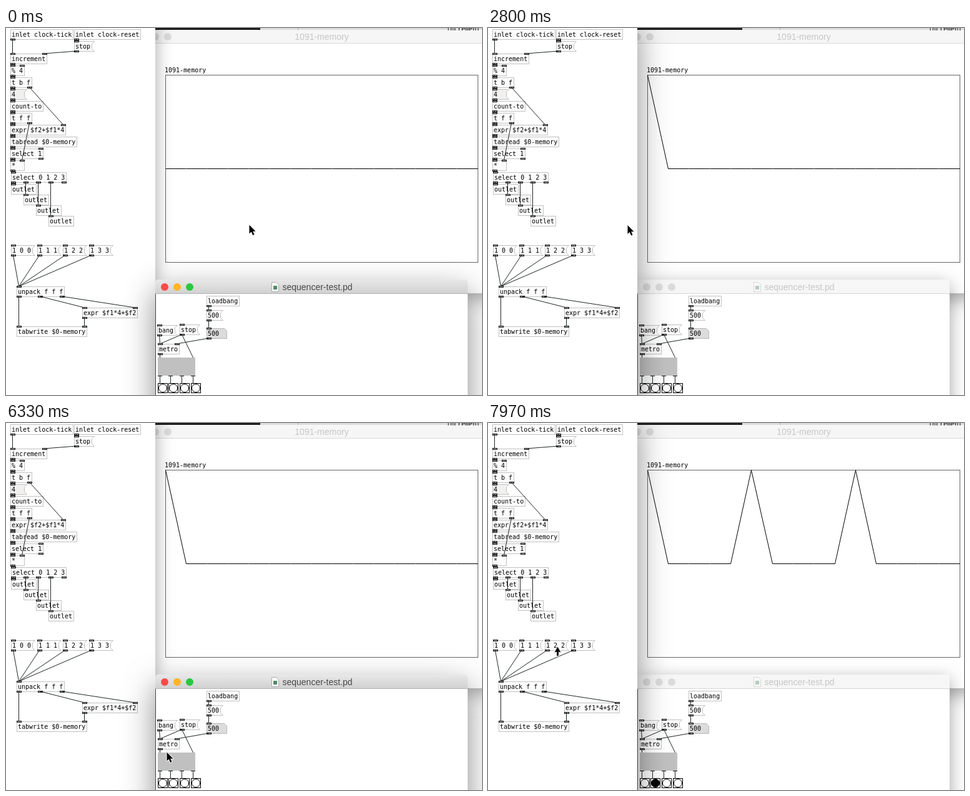
These frames come from a looping animation (762 by 588 pixels, 8000 ms). An HTML page with a canvas:

```html
<!DOCTYPE html>
<html lang="en">
<head>
<meta charset="utf-8">
<title>Sequencer patch</title>
<style>
html, body { margin: 0; width: 762px; height: 588px; overflow: hidden; background: #fff; }
canvas { display: block; }
</style>
</head>
<body>
<canvas width="762" height="588"></canvas>
<script>
const c = document.querySelector('canvas').getContext('2d');
const LOOP = 8000;
const MONO = '10px "DejaVu Sans Mono", monospace';
const SANS = '14px "Liberation Sans", Arial, sans-serif';

const FOCUS_LEFT = 800, FOCUS_SEQ = 3130, FOCUS_LEFT_AGAIN = 7000;
const STORE = [1500, 7230, 7730];   // clicks on "1 0 0", "1 1 1", "1 2 2"
const START = 3510, BEAT = 494, FLASH = 255, PRESS = 120;

const between = (t, a, b) => t >= a && t < b;
const range = n => [...Array(n).keys()];

function rect(x, y, w, h, fill) {
  c.fillStyle = fill;
  c.fillRect(x, y, w, h);
}

function outline(x, y, w, h, stroke) {
  c.strokeStyle = stroke;
  c.lineWidth = 1;
  c.strokeRect(x + .5, y + .5, w, h);
}

function path(points, stroke, fill, width = 1, closed = true) {
  c.beginPath();
  points.forEach(([x, y]) => c.lineTo(x, y));
  if (closed) c.closePath();
  if (fill) { c.fillStyle = fill; c.fill(); }
  if (stroke) { c.strokeStyle = stroke; c.lineWidth = width; c.stroke(); }
}

function disc(x, y, r, fill, stroke) {
  c.beginPath();
  c.arc(x, y, r, 0, 7);
  c.fillStyle = fill;
  c.fill();
  if (stroke) { c.strokeStyle = stroke; c.lineWidth = 1; c.stroke(); }
}

function text(s, x, y, font = MONO, fill = '#000', align = 'left') {
  c.font = font;
  c.fillStyle = fill;
  c.textAlign = align;
  c.fillText(s, x, y);
}

// ---- patch objects: each knows where its cords attach ----
const portX = (x, w, n, i) => Math.floor(x + (n > 1 ? (w - 8) * i / (n - 1) : 0));

function ports(x, y, w, n) {
  for (const i of range(n)) {
    rect(portX(x, w, n, i), y, 8, 3, '#111');
    rect(portX(x, w, n, i) + 1, y + 1, 6, 1, '#b8c0bc');
  }
}

function node(x, y, w, h, ins, outs) {
  return {
    in: i => [portX(x, w, ins, i) + 3.5, y],
    out: i => [portX(x, w, outs, i) + 3.5, y + h],
  };
}

function label(s, x, y, w, ins, outs) {
  ports(x, y - 1, w, ins);
  ports(x, y + 15, w, outs);
  text(s, x + 2, y + 12);
  return node(x, y, w, 16, ins, outs);
}

const widthOf = s => Math.max(s.length * 6 + 5, 23);

function box(s, x, y, ins, outs) {
  const w = widthOf(s);
  rect(x, y, w, 16, '#fcfcfc');
  outline(x, y, w - 1, 16, '#c2c2c2');
  return label(s, x, y, w, ins, outs);
}

function message(s, x, y, pressed = false, fill = '#fbfbfb') {
  const w = widthOf(s) + 4, l = x + .5, t = y + .5, r = l + w - 1, b = t + 16;
  path([[l, t], [r, t], [r - 4, t + 4], [r - 4, b - 4], [r, b], [l, b]],
    pressed ? '#000' : '#c2c2c2', fill, pressed ? 3 : 1);
  return label(s, x, y, w, 1, 1);
}

function numberBox(s, x, y, w) {
  const l = x + .5, t = y + .5, r = l + w - 1, b = t + 16;
  path([[l, t], [r - 4, t], [r, t + 4], [r, b], [l, b]], '#b8b8b8', '#dcdcdc');
  return label(s, x, y, w, 1, 1);
}

function cord(from, to, outlet = 0, inlet = 0) {
  path([from.out(outlet), to.in(inlet)], '#1c2622', null, 1, false);
}

// ---- windows ----
function pane(x, y, w, h, active, radius = 5) {
  c.save();
  c.shadowColor = `rgba(0,0,0,${active ? .45 : .36})`;
  c.shadowBlur = active ? 50 : 28;
  c.shadowOffsetY = active ? 18 : 8;
  c.fillStyle = '#fff';
  c.beginPath();
  c.roundRect(x, y, w, h, [radius, radius, 0, 0]);
  c.fill();
  c.restore();
}

function leftPatch(t, active) {
  pane(-300, -22, 539, 700, active);
  const tick = box('inlet clock-tick', 7, 2, 0, 1);
  const reset = box('inlet clock-reset', 109, 2, 0, 1);
  const stop = message('stop', 109, 21);

  const row = i => 41 + 19 * i;
  const increment = box('increment', 7, row(0), 2, 1);
  const modulo = box('% 4', 7, row(1), 2, 1);
  const split = box('t b f', 7, row(2), 1, 2);
  const four = message('4', 7, row(3), false, '#f1f0ef');
  const count = box('count-to', 7, row(4), 1, 1);
  const copy = box('t f f', 7, row(5), 1, 2);
  const index = box('expr $f2+$f1*4', 7, row(6), 2, 1);
  const read = box('tabread $0-memory', 7, row(7), 1, 1);
  const isOne = box('select 1', 7, row(8), 2, 2);
  const times = box('*', 7, row(9), 2, 1);
  const route = box('select 0 1 2 3', 8, row(10), 1, 5);
  const chain = [tick, increment, modulo, split, four, count, copy, index, read, isOne, times, route];
  chain.slice(1).forEach((o, i) => cord(chain[i], o));
  cord(reset, stop);
  cord(stop, increment, 0, 1);
  cord(split, index, 1, 1);
  cord(copy, times, 1, 1);
  range(4).map(i => box('outlet', 8 + 20 * i, 250 + 17 * i, 1, 0))
    .forEach((o, i) => cord(route, o, i));

  const unpack = box('unpack f f f', 17, 414, 1, 3);
  const cell = box('expr $f1*4+$f2', 122, 448, 2, 1);
  const write = box('tabwrite $0-memory', 17, 478, 2, 0);
  for (const i of range(4)) {
    const pressed = between(t, STORE[i], STORE[i] + PRESS);
    cord(message(`1 ${i} ${i}`, Math.round(8 + 41.7 * i), 348, pressed), unpack);
  }
  cord(unpack, write);
  cord(unpack, cell, 1, 0);
  cord(unpack, cell, 2, 1);
  cord(cell, write, 0, 1);
}

function memoryWindow(t) {
  pane(239, 3, 560, 422, false, 0);
  // strip of the windows behind
  rect(239, 0, 523, 3, '#dcdcdc');
  rect(239, 0, 168, 3, '#1d1a1d');
  rect(467, 0, 1, 3, '#aaa');
  rect(239, 3, 523, 22, '#f6f6f6');
  rect(239, 24, 523, 1, '#dadada');
  disc(239, 14, 6, '#dcdcdc');
  disc(259, 14, 6, '#dcdcdc');
  c.save();
  c.beginPath();
  c.rect(700, 0, 62, 4);
  c.clip();
  text('increment', 705, 5);
  c.restore();
  text('1091-memory', 505.5, 19, SANS, '#c6c6c6', 'center');
  text('1091-memory', 254, 71);

  outline(255, 75, 500, 300, '#666');
  // sixteen cells; every fifth one can be set
  const high = i => i % 5 === 0 && t >= STORE[i / 5];
  path(range(16).map(i => [Math.floor(255 + i * 500 / 15) + .5, high(i) ? 75.5 : 225.5]),
    '#000', null, 1, false);
}

function sequencerWindow(t, active) {
  pane(239, 403, 500, 260, active);
  const bar = c.createLinearGradient(0, 403, 0, 426);
  bar.addColorStop(0, active ? '#e9e8e9' : '#f6f6f6');
  bar.addColorStop(1, active ? '#d1d0d1' : '#f6f6f6');
  c.fillStyle = bar;
  c.beginPath();
  c.roundRect(239, 403, 500, 23, [5, 5, 0, 0]);
  c.fill();
  rect(239, 425, 500, 1, active ? '#b4b2b4' : '#d6d6d6');
  ['#fc4b48', '#fdb524', '#29c840'].forEach((color, i) =>
    disc(254 + 20 * i, 415, 6, active ? color : '#dcdcdc'));
  c.globalAlpha = active ? 1 : .4;
  path([[425.5, 407.5], [432.5, 407.5], [436.5, 411.5], [436.5, 422.5], [425.5, 422.5]], '#aaa', '#fff');
  rect(428, 413, 6, 6, '#4f8a68');
  c.globalAlpha = 1;
  text('sequencer-test.pd', 498.5, 420, SANS, active ? '#484848' : '#c6c6c6', 'center');

  rect(239, 426, 1, 162, '#444');
  const load = box('loadbang', 321, 429, 0, 1);
  const speed = message('500', 321, 452);
  const shown = numberBox('500', 321, 481, 33);
  const bang = message('bang', 242, 476, between(t, START, START + PRESS));
  const stop = message('stop', 278, 475);
  const metro = box('metro', 243, 506, 2, 1);
  const gray = node(243, 528, 61, 29, 2, 4);
  rect(243, 528, 60, 29, '#c0c0c0');
  cord(load, speed);
  cord(speed, shown);
  cord(shown, metro, 0, 1);
  cord(bang, metro);
  cord(stop, metro);
  cord(stop, gray, 0, 1);
  cord(metro, gray);

  const beat = Math.floor((t - START) / BEAT);
  const flashing = t >= START && t - START - beat * BEAT < FLASH;
  for (const i of range(4)) {
    const x = portX(243, 61, 4, i);
    const lit = flashing && beat % 4 === i && t >= STORE[i];
    rect(x, 557, 7, 1, '#111');
    cord(gray, node(x, 569, 15, 15, 1, 1), i);
    rect(x, 569, 15, 15, '#fff');
    outline(x, 569, 15, 15, '#000');
    disc(x + 8, 577, 6.5, lit ? '#000' : '#fff', '#000');
  }
}

// ---- pointer: eased moves [start, end, x, y], resting in between ----
const HOME = [389, 315];
const MOVES = [
  [30, 770, 27, 353],      // to "1 0 0"
  [1560, 1930, 280, 121],  // up to the graph
  [1930, 2130, 293, 135],
  [2330, 2760, 222, 310],  // back down to the sequencer
  [2760, 3130, 252, 474],
  [3200, 3480, 261, 487],  // onto "bang"
  [3770, 4100, 251, 557],  // watch the lights
  [4830, 4970, 257, 549],
  [5770, 5900, 257, 527],
  [6330, 6960, 70, 359],   // to "1 1 1"
  [7340, 7640, 111, 358],  // to "1 2 2"
];

function pointerAt(t) {
  return MOVES.reduce(([px, py], [a, b, x, y]) => {
    const u = Math.min(1, Math.max(0, (t - a) / (b - a))), e = u * u * (3 - 2 * u);
    return [px + (x - px) * e, py + (y - py) * e];
  }, HOME);
}

const ARROW = [[0, 0], [0, 14], [3.2, 11], [5.6, 16.5], [8, 15.5], [5.7, 10.2], [10, 10.2]];
const UP = [[0, 0], [5, 9], [1.5, 8], [1.5, 14.5], [-1.5, 14.5], [-1.5, 8], [-5, 9]];

function pointer(t) {
  const [x, y] = pointerAt(t);
  const overMessage = between(t, FOCUS_LEFT, 1590) || between(t, 3260, 3830) || t >= FOCUS_LEFT_AGAIN;
  const shape = (overMessage ? UP : ARROW).map(([dx, dy]) => [x + dx + .5, y + dy + .5]);
  c.lineJoin = 'round';
  path(shape, '#fff', null, 2);
  path(shape, null, '#000');
  c.lineJoin = 'miter';
}

function draw(now) {
  const t = now % LOOP;
  const seqActive = t < FOCUS_LEFT || between(t, FOCUS_SEQ, FOCUS_LEFT_AGAIN);
  rect(0, 0, 762, 588, '#fff');
  memoryWindow(t);
  if (seqActive) {
    leftPatch(t, false);
    sequencerWindow(t, true);
  } else {
    sequencerWindow(t, false);
    leftPatch(t, true);
  }
  pointer(t);
  requestAnimationFrame(draw);
}
requestAnimationFrame(draw);
</script>
</body>
</html>
```
